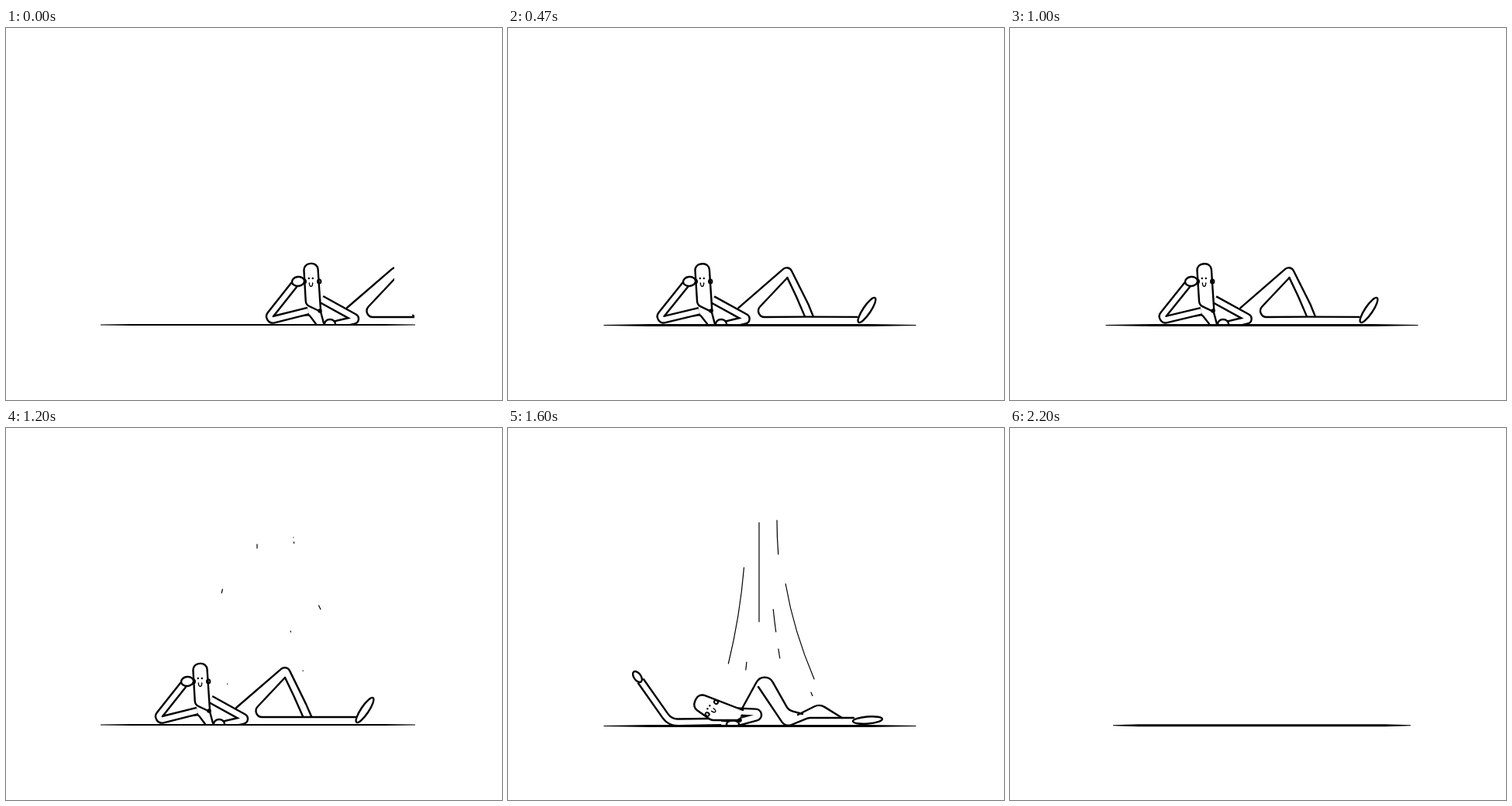
Write an HTML page with a canvas that moves like this. It is 640x480 px and loops after 2340 ms.

```html
<!DOCTYPE html>
<html lang="en">
<head>
<meta charset="utf-8">
<title>Reclining figure</title>
<style>
html, body { margin: 0; width: 100%; height: 100%; overflow: hidden; background: #fff; }
canvas { display: block; width: 640px; height: 480px; }
</style>
</head>
<body>
<canvas id="stage" width="640" height="480"></canvas>
<script>
const ctx = document.getElementById('stage').getContext('2d');
const LOOP = 2340, STEP = 1000 / 15;
const GROUND = 383, SKY = 118, DEPTH = 228, LINE = 2.4;

const clamp = v => Math.max(0, Math.min(1, v));
const lerp = (a, b, p) => a + (b - a) * p;
const mix = (a, b, p) => a.map((v, i) => lerp(v, b[i], p));
const parse = s => s.split(' ').map(p => p.split(',').map(Number));

// Joints when resting and when collapsed, with the rounding radius of each pose.
const bone = (rest, fallen, radii) => ({ rest: parse(rest), fallen: parse(fallen), radii });

const shin = bone('360,322 371,345 383,372', '374,370 402,356 431,374', [2, 14]);
const thigh = bone('297,361 362,305 387,356 394,372', '302,362 331,309 362,364 380,369', [7, 12]);
const leg = bone('451,373 385,373 312,373 360,322', '446,374 388,374 358,386 323,334', [8, 10]);
const farArm = bone('264,350 311,376 272,385', '295,366 339,368 298,379', [2, 3]);
const nearArm = bone('229,331 191,379 247,365', '171,326 209,380 275,379', [4, 20]);
const chest = bone('240,371 248,370 257,382', '264,377 281,378 298,376', [4, 4]);
const tie = bone('263,366 267,381', '300,364 303,363', [0, 0]);
const head = bone('263,366 244,357 241,305 259,303 263,364',
                  '298,377 262,377 238,360 246,342 303,364', [8, 9]);

// Ellipses: x, y, rx, ry, rotation in both poses.
const foot = [[463, 364, 19, 5, -.98], [464, 377, 19, 4.5, -.08]];
const farHand = [[275, 382, 7, 6, 0], [290, 382, 8, 4.5, 0]];
const nearHand = [[234, 327, 8, 6, -.1], [167, 321, 8, 4.5, .95]];
const face = [[251.5, 326, 0], [262, 361, -.95]];

// Wind streaks: lane offset, top and length when the gust peaks.
const streaks = parse('-17,180,124 -7,302,10 0,122,128 12,234,29 12,285,12 23,119,44 27,201,123 23,341,5');

function trace({ rest, fallen, radii }, fall, boil) {
  const pts = rest.map((p, i) => mix(p, fallen[i], fall)
    .map((v, axis) => v + boil * .4 * Math.sin(i * 2 + axis + p[0])));
  const radius = lerp(...radii, fall);
  ctx.beginPath();
  ctx.moveTo(...pts[0]);
  for (let i = 1; i < pts.length - 1; i++) ctx.arcTo(...pts[i], ...pts[i + 1], radius);
  ctx.lineTo(...pts[pts.length - 1]);
}

function ink(width = LINE, color = '#000') {
  ctx.lineWidth = width;
  ctx.strokeStyle = color;
  ctx.stroke();
}

function outline() {
  ctx.fillStyle = '#fff';
  ctx.fill();
  ink();
}

// A limb of even thickness: a black stroke with a white core.
function tube(width) {
  ctx.lineCap = 'butt';
  ink(width + LINE);
  ink(width - LINE, '#fff');
  ctx.lineCap = 'round';
}

function oval([x, y, rx, ry = rx, turn = 0]) {
  ctx.beginPath();
  ctx.ellipse(x, y, rx, ry, turn, 0, Math.PI * 2);
}

function drawFace(fall) {
  const [x, y, turn] = mix(...face, fall);
  ctx.save();
  ctx.translate(x, y);
  ctx.rotate(turn);
  for (const side of [-1, 1]) {
    oval([side * 9.7, 1, 2.2, 2.6]);
    ink(2);
    oval([side * 2.5 - 1.2, -3, 1.2]);
    ctx.fillStyle = '#000';
    ctx.fill();
  }
  ctx.beginPath();
  ctx.moveTo(-3.2, 3);
  ctx.bezierCurveTo(-2.8, 9, 1, 9, 1.2, 3);
  ink(1.4);
  ctx.restore();
}

function drawFigure(fall, height, shift, boil) {
  const pose = part => trace(part, fall, boil);
  const shape = part => oval(mix(...part, fall));
  ctx.save();
  ctx.beginPath();
  if (shift > 0) {
    for (const p of parse('0,290 501,290 501,367 527,370 527,384 0,384')) ctx.lineTo(...p);
  } else {
    ctx.rect(0, 0, 640, GROUND + 1);
  }
  ctx.clip();
  ctx.translate(shift, GROUND * (1 - height));
  ctx.scale(1, height);

  for (const part of [shin, thigh, leg]) { pose(part); ink(); }
  shape(foot); outline();
  pose(farArm); tube(9);
  shape(farHand); outline();
  for (const part of [chest, tie]) { pose(part); ink(); }
  pose(nearArm); tube(8.6);
  pose(head); outline();
  drawFace(fall);
  oval([lerp(262, 299, fall), lerp(365, 377, fall), 2.8]);
  ctx.fillStyle = '#000';
  ctx.fill();
  shape(nearHand); outline();
  ctx.restore();
}

function drawFloor(inset, y, half, taper) {
  const left = 122 + inset, right = 528 - inset;
  ctx.fillStyle = '#000';
  ctx.beginPath();
  for (const side of [-1, 1]) {
    const ends = [[left, .5], [left + taper, half], [right - taper, half], [right, .5]];
    if (side > 0) ends.reverse();
    for (const [x, h] of ends) ctx.lineTo(x, y + side * h);
  }
  ctx.fill();
}

// Streaks fall down a funnel, growing until the collapse and then dying away.
function drawWind(t) {
  const since = t - 1600;
  const power = since < 0 ? clamp(1 + since / 500) : clamp(1 - since / 530);
  if (power === 0) return;
  const spread = since < 0 ? 1 - since / 400 : 1;
  const flare = 2 * clamp(1 - since / 270);
  const laneX = (off, y) => 324 + off * spread * (1 + flare * ((y - SKY) / DEPTH) ** 2);

  ctx.save();
  ctx.beginPath();
  ctx.rect(0, SKY, 640, DEPTH);
  ctx.clip();
  for (const [off, peak, size] of streaks) {
    const drop = peak - SKY + since * .5;
    const top = SKY + (drop % DEPTH + DEPTH) % DEPTH;
    const end = top + size * power ** 2, mid = (top + end) / 2;
    const a = laneX(off, top), b = laneX(off, end);
    ctx.beginPath();
    ctx.moveTo(a, top);
    ctx.quadraticCurveTo(2 * laneX(off, mid) - (a + b) / 2, mid, b, end);
    ink(1.2);
  }
  ctx.restore();
}

function render(ms) {
  const step = Math.min(33, Math.floor((ms % LOOP + 4) / STEP));
  const sink = clamp((step - 20) / 4);
  const fall = sink * sink * (3 - 2 * sink);
  const height = 1 - clamp((step - 24) / 4);
  const shift = 143 * (1 - clamp(step / 7)) ** 1.4;
  const boil = step % 2;

  ctx.fillStyle = '#fff';
  ctx.fillRect(0, 0, 640, 480);
  ctx.lineCap = ctx.lineJoin = 'round';

  drawWind(step * STEP);
  if (height > 0) drawFigure(fall, height, shift, boil);
  if (height < .3) drawFloor(step % 5 === 3 ? 11 : 10, 383.7, 1.5, 33);
  else if (boil || fall === 1) drawFloor(1.5, 383.5 + fall, 1.4, 60);
  else drawFloor(0, 383, .9, 40);
}

const start = performance.now();
function tick() {
  render(performance.now() - start);
  requestAnimationFrame(tick);
}
tick();
</script>
</body>
</html>
```
